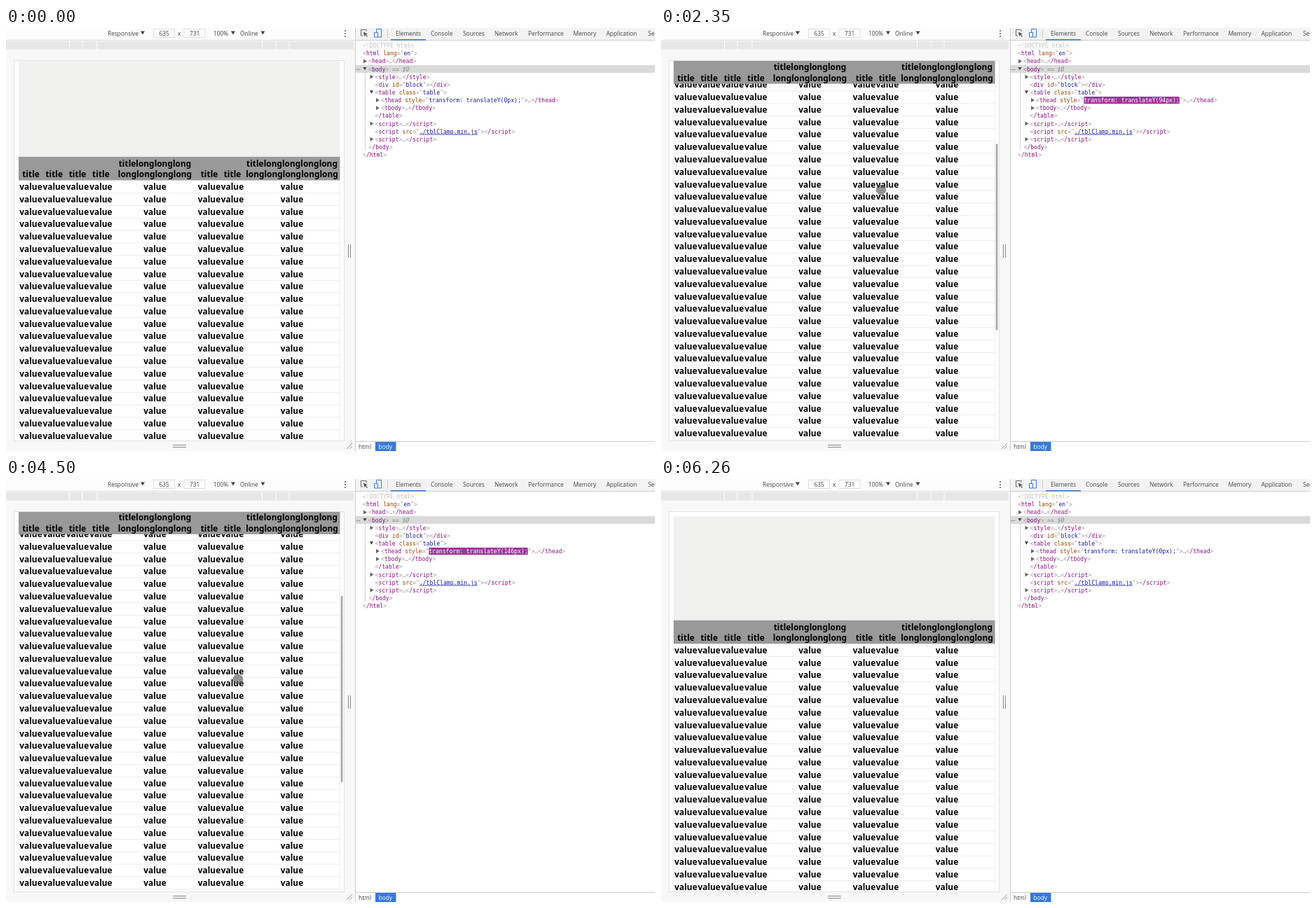
These frames come from a looping animation (926x604 px, 7060 ms). An HTML page:

```html
<!DOCTYPE html>
<html lang="en">
<head>
<meta charset="utf-8">
<style>
  html, body { margin: 0; width: 100%; height: 100%; overflow: hidden; background: #fff; }
  svg { display: block; }
  text { white-space: pre; }
  .ui { font: 8.4px "Open Sans", "Noto Sans", sans-serif; fill: #444; }
  .code { font: 8.1px "DejaVu Sans Mono", monospace; fill: #a894a6; }
  .cell { font: bold 11.9px "Noto Sans", "Open Sans", sans-serif; fill: #000; text-anchor: middle; }
  .t { fill: #881280; }
  .a { fill: #994500; }
  .v { fill: #1a1aa6; }
  .link { text-decoration: underline; }
  .dim { fill: #c0c0c0; }
  .sel { fill: #888; font-style: italic; }
</style>
</head>
<body>
<svg id="stage" width="926" height="604" viewBox="0 0 926 604">
  <defs><clipPath id="view"><rect x="12" y="47" width="470" height="542"/></clipPath></defs>
  <g id="device"></g>
  <g clip-path="url(#view)">
    <g id="page"></g>
    <g id="head"></g>
    <rect id="bar" x="477.7" width="2.8" height="266" rx="1" fill="#aaa"/>
  </g>
  <g id="tools"></g>
  <circle id="touch" r="7.3" fill="#505050" fill-opacity=".62"/>
  <path id="arrow" d="M.5 .5V12L3.2 9.6 5 13.5 6.8 12.7 5.1 9H8.5Z" fill="#fff" stroke="#000" stroke-width=".8"/>
</svg>
<script>
const $ = id => document.getElementById(id);
const LOOP = 7060, STEP = 76.7, CHAR = 4.876;
const ROW = 17.78, HEAD_TOP = 201.7, HEAD_H = 33.6, STUCK = 46, ZOOM = 0.7417;

function add(parent, tag, attrs, html = '') {
  const node = document.createElementNS('http://www.w3.org/2000/svg', tag);
  for (const k in attrs) node.setAttribute(k, attrs[k]);
  node.innerHTML = html;
  parent.append(node);
  return node;
}
const rect = (p, x, y, width, height, fill, more) => add(p, 'rect', { x, y, width, height, fill, ...more });
const path = (p, d, stroke, fill = 'none') => add(p, 'path', { d, stroke, fill });
const label = (p, x, y, cls, text) => add(p, 'text', { x, y, class: cls }, text);
const down = (p, x, y, s = 3) => path(p, `M${x - s} ${y - s}h${2 * s}l${-s} ${2 * s - 1}z`, 'none', '#444');
const right = (p, x, y) => path(p, `M${x - 2} ${y - 3}l5 3l-5 3z`, 'none', '#666');

function buildDevice() {
  const g = $('device');
  rect(g, 0, 0, 498, 604, '#f8f8f8');
  rect(g, 0, 0, 498, 17, '#fcfcfc');
  path(g, 'M0 17.5H498', '#ddd');
  rect(g, 0, 19, 496, 11.5, '#e7e7e7');
  for (const x of [90.5, 109, 130, 365.5, 385, 404]) path(g, `M${x} 19v12`, '#fff');
  rect(g, 11.5, 46.5, 471, 543, '#fff', { stroke: '#e2e2e2' });
  label(g, 145, 11, 'ui', 'Responsive');
  label(g, 296, 11, 'ui', '100%');
  label(g, 334, 11, 'ui', 'Online');
  for (const x of [195, 324, 366.5]) down(g, x, 7.5);
  for (const [x, text] of [[210.5, '635'], [254, '731']]) {
    rect(g, x, 1.5, 30, 12, '#fff', { stroke: '#ddd' });
    label(g, x + 8, 11, 'ui', text);
  }
  label(g, 245, 11, 'ui', 'x');
  for (const y of [4, 8, 12]) add(g, 'circle', { cx: 484, cy: y, r: 1, fill: '#555' });
  path(g, 'M488.5 309v19M491.5 309v19M238 595.5h19M238 598.5h19', '#888');
  path(g, 'M486 601l8-8M490 601l4-4', '#999');
}

function buildPage() {
  const g = $('page'), h = $('head');
  const cols = [35.5, 68.7, 102, 135.4, 212.5, 290, 323, 408];
  rect(g, 18, 53.4, 458.5, HEAD_TOP - 53.4, '#f0f0ef');
  path(g, 'M18.5 235V1060M476.5 235V1060', '#f0f0f0');
  for (let i = 0; i < 46; i++) {
    path(g, `M18 ${253.6 + ROW * i}H476.5`, '#ececec');
    for (const x of cols) label(g, x, 248.9 + ROW * i, 'cell', 'value');
  }
  rect(h, 18, 0, 458.5, HEAD_H, '#999');
  cols.forEach((x, i) => {
    const n = i === 4 ? 4 : i === 7 ? 5 : 0;
    if (n) label(h, x, 14, 'cell', 'title' + 'long'.repeat(n - 1));
    label(h, x, 29.6, 'cell', n ? 'long'.repeat(n) : 'title');
  });
}

const span = (cls, text) => `<tspan class="${cls}">${text}</tspan>`;
const open = (name, attrs = '') => `&lt;${span('t', name)}${attrs}&gt;`;
const close = name => `&lt;${span('t', '/' + name)}&gt;`;
const attr = (name, value, cls = 'v') => ` ${span('a', name)}="${span(cls, value)}"`;
const folded = name => open(name) + '…' + close(name);

function buildTools() {
  const g = $('tools');
  rect(g, 498, 0, 428, 604, '#fff');
  rect(g, 498, 0, 428, 17, '#f3f3f3');
  path(g, 'M498 17.5H926M498 590.5H926M498.5 0V604M544.5 2V14', '#ccc');
  path(g, 'M514 5V2.5H506.5V11H509', '#666');
  path(g, 'M510 5.5l6 3-2.5 .7 2.5 3-1 .8-2.4-3-1.4 2z', 'none', '#555');
  path(g, 'M528.5 7V1.5H535.5V13H531M525.5 6.5h5v6.5h-5z', '#3b79d8');
  const tabs = [[556, 'Elements'], [606, 'Console'], [652, 'Sources'], [697, 'Network'],
    [745, 'Performance'], [809.5, 'Memory'], [856.5, 'Application'], [916, 'Security']];
  for (const [x, text] of tabs) label(g, x, 11, 'ui', text);
  rect(g, 549, 16, 50, 1.6, '#3b79d8');

  rect(g, 499, 53, 427, 11, '#dadada');
  path(g, 'M512.5 64V175', '#c8d3ea');
  label(g, 499, 60, 'ui', '…');
  const lines = [
    [509, span('dim', '&lt;!DOCTYPE html&gt;')],
    [509, open('html', attr('lang', 'en'))],
    [517, folded('head'), right],
    [517, open('body') + span('sel', ' == $0'), down],
    [526.5, folded('style'), right],
    [526.5, open('div', attr('id', 'block')) + close('div')],
    [526.5, open('table', attr('class', 'table')), down],
    [535, open('thead', attr('style', '', 'v live')) + '…' + close('thead'), right],
    [535, folded('tbody'), right],
    [526.5, close('table')],
    [526.5, folded('script'), right],
    [526.5, open('script', attr('src', './tblClamp.min.js', 'v link')) + close('script')],
    [526.5, folded('script'), right],
    [517.5, close('body')],
    [509, close('html')]
  ];
  rect(g, 535 + 14 * CHAR, 98, 0, 10.3, 'none', { id: 'flash', rx: 1.5 });
  lines.forEach(([x, html, mark], i) => {
    const y = 28.2 + 11.13 * i;
    label(g, x, y, 'code', html);
    if (mark) mark(g, x - 5, y - 3, 2.7);
  });
  rect(g, 527, 591, 29.5, 13, '#3879d9');
  label(g, 503, 601, 'ui', 'html');
  label(g, 531.5, 601, 'ui', 'body').style.fill = '#fff';
}

// Keys are [time, value, value...], joined by straight lines
function track(keys, t) {
  let i = keys.findIndex(k => k[0] > t);
  if (i < 0) return keys[keys.length - 1].slice(1);
  if (i === 0) return keys[0].slice(1);
  const a = keys[i - 1], b = keys[i], p = (t - a[0]) / (b[0] - a[0]);
  return a.slice(1).map((v, j) => v + (b[j + 1] - v) * p);
}
const scrollKeys = [[1180, 17.8], [1580, 127], [1733, 145.5], [2347, 234.6], [2880, 370.4],
  [3960, 370.4], [4418, 262], [4495, 236.9], [4690, 150], [5262, 51.5], [5650, 0]];
const pointerKeys = [[260, 726, 569], [720, 344, 162], [890, 344, 162], [1180, 312, 450],
  [1580, 304, 345], [1733, 304, 326.5], [2347, 314, 231], [2880, 308, 103], [3190, 304, 120],
  [3421, 300.5, 255], [3880, 320, 160], [3960, 322, 153], [4418, 331, 260], [4495, 331, 286],
  [4690, 331, 372], [5262, 331, 467], [5650, 345, 525], [6180, 856, 563]];
const barKeys = [[1180, 0], [1260, 1], [3350, 1], [3650, 0], [3960, 0], [4040, 1], [5800, 1], [6100, 0]];

const scrollAt = t => track(scrollKeys, t)[0];
const shiftAt = t => Math.max(0, Math.round((scrollAt(t - STEP) - 153.8) / ZOOM));

function tick(t) {
  if (t < 260) return 0;
  if (t < 890) return Math.min(720, 260 + Math.floor((t - 255) / STEP) * STEP);
  return 890 + Math.floor((t - 885) / STEP) * STEP;
}

const mix = (a, b, p) => `rgb(${a.map((v, i) => Math.round(v + (b[i] - v) * p))})`;

function drawStyle(t) {
  const shift = shiftAt(t), text = `transform: translateY(${shift}px);`;
  const live = document.querySelector('.live'), flash = $('flash');
  let age = 0;
  while (age < 1400 && shiftAt(t - age - STEP) === shift) age += STEP;
  live.textContent = text;
  flash.setAttribute('width', text.length * CHAR);
  if (age >= 1400) {
    flash.style.fill = 'none';
    live.style.fill = '';
    return;
  }
  const pale = [245, 219, 244], grey = [168, 148, 166];
  if (age < 1120) {
    const p = 1 - (1 - age / 1120) ** 2;
    flash.style.fill = mix([158, 54, 153], pale, p);
    live.style.fill = mix([255, 255, 255], grey, p);
  } else {
    const p = (age - 1120) / 280;
    flash.style.fill = mix(pale, [255, 255, 255], p);
    live.style.fill = mix(grey, [26, 26, 166], p);
  }
}

function draw(time) {
  const now = time % LOOP, t = tick(now);
  const scroll = now < 6260 ? scrollAt(t) : 0;
  const stuck = t > 3960 ? STUCK - 0.8 : STUCK;
  $('page').setAttribute('transform', `translate(0 ${-scroll})`);
  $('head').setAttribute('transform', `translate(0 ${Math.max(stuck, HEAD_TOP - scroll)})`);
  $('bar').setAttribute('y', 48.2 + scroll / 2);
  $('bar').style.opacity = track(barKeys, t)[0];
  drawStyle(t);

  const [x, y] = track(pointerKeys, t);
  const shown = now >= 260 && now < 6260, inside = x < 482 && y > 47;
  for (const id of ['touch', 'arrow']) {
    $(id).setAttribute('transform', `translate(${x} ${y})`);
    $(id).style.display = shown && inside === (id === 'touch') ? '' : 'none';
  }
}

buildDevice();
buildPage();
buildTools();
const start = performance.now();
function frame() {
  draw(performance.now() - start);
  requestAnimationFrame(frame);
}
frame();
</script>
</body>
</html>
```
